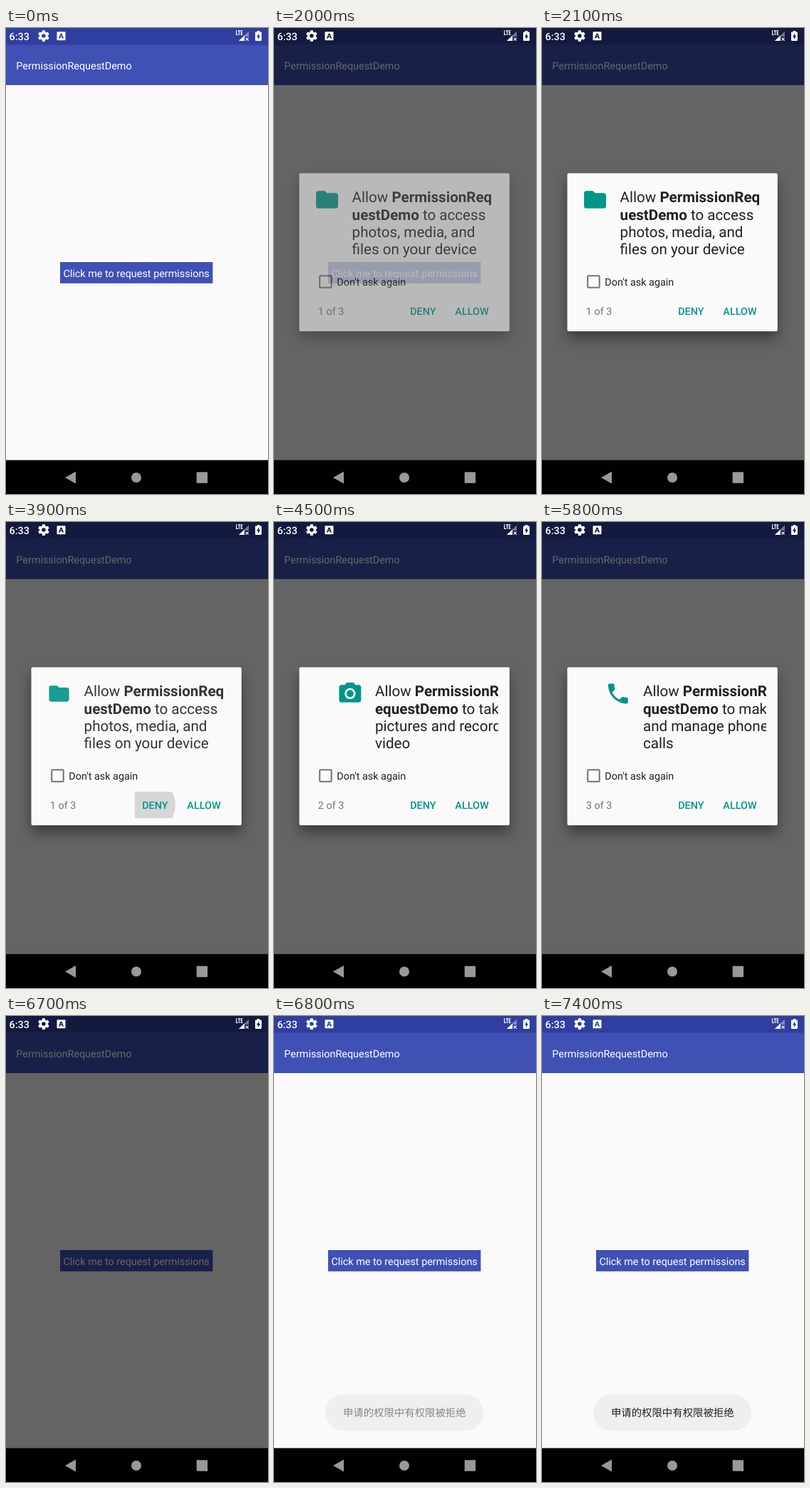
Recreate the animation shown at these times as an HTML page. Size 368 by 653 pixels, loop 7800 ms.

```html
<!DOCTYPE html>
<html lang="en">
<head>
<meta charset="utf-8">
<title>Permission request</title>
<style>
  html, body { margin: 0; width: 100%; height: 100%; overflow: hidden; background: #000; }
  svg { display: block; width: 100%; height: 100%; }
  text { font: 14.4px Roboto, sans-serif; text-rendering: geometricPrecision; }
  .medium { font-weight: 500; }
  .question { font-size: 20.6px; fill: #212121; }
  .question .app { font-weight: 700; }
  .action { font-weight: 500; fill: #009688; text-anchor: middle; }
  .toast { font-family: "Noto Sans CJK SC", "Noto Sans CJK", sans-serif; fill: #212121; }
  #dialog { filter: drop-shadow(0 10px 9px rgba(0, 0, 0, .4)); }
</style>
</head>
<body>
<svg viewBox="0 0 368 653">
  <defs>
    <clipPath id="panelClip"><rect x="36" y="204" width="279" height="130"/></clipPath>
    <clipPath id="denyClip"><rect x="181" y="378" width="57" height="37" rx="2"/></clipPath>
  </defs>

  <!-- App screen -->
  <rect width="368" height="606" fill="#fafafa"/>
  <rect width="368" height="80" fill="#3f51b5"/>
  <rect width="368" height="23.5" fill="#303f9f"/>
  <text x="14.3" y="57.6" fill="#fff">PermissionRequestDemo</text>
  <rect x="76" y="328" width="214.4" height="29.8" fill="#3f51b5"/>
  <text x="80.4" y="348.6" fill="#fff">Click me to request permissions</text>
  <rect id="dim" width="368" height="606" opacity=".6"/>

  <!-- Status bar -->
  <g fill="#fff" fill-rule="evenodd">
    <text class="medium" x="4.6" y="16.7">6:33</text>
    <path transform="translate(43.4 1.6) scale(.79)" d="M19.43 12.98c.04-.32.07-.64.07-.98s-.03-.66-.07-.98l2.11-1.65c.19-.15.24-.42.12-.64l-2-3.46c-.12-.22-.39-.3-.61-.22l-2.49 1c-.52-.4-1.08-.73-1.69-.98l-.38-2.65C14.46 2.18 14.25 2 14 2h-4c-.25 0-.46.18-.49.42l-.38 2.65c-.61.25-1.17.59-1.69.98l-2.49-1c-.23-.09-.49 0-.61.22l-2 3.46c-.13.22-.07.49.12.64l2.11 1.65c-.04.32-.07.65-.07.98s.03.66.07.98l-2.11 1.65c-.19.15-.24.42-.12.64l2 3.46c.12.22.39.3.61.22l2.49-1c.52.4 1.08.73 1.69.98l.38 2.65c.03.24.24.42.49.42h4c.25 0 .46-.18.49-.42l.38-2.65c.61-.25 1.17-.59 1.69-.98l2.49 1c.23.09.49 0 .61-.22l2-3.46c.12-.22.07-.49-.12-.64zM12 15.5a3.5 3.5 0 1 1 0-7a3.5 3.5 0 0 1 0 7z"/>
    <path transform="translate(77.5 11.2)" d="M-5-6H5q1 0 1 1V5q0 1-1 1H-5q-1 0-1-1V-5q0-1 1-1zM-1-3.5H1L3.6 3.5H2L1.4 1.8H-1.4L-2 3.5H-3.6zM0-1.8L-.9.6H.9z"/>
    <path d="M341 4.5V12h-6v6h-8z" opacity=".4"/>
    <path d="M335 10.5V18h-8z"/>
    <path d="M336.6 13.6l4 4m0-4l-4 4" stroke="#fff" stroke-width="1.2"/>
    <path d="M323.6 3.3v6.1h2.2M325.7 3.9h3.4M327.4 3.9v6M332.5 3.9h-2.3v5.5h2.3M330.2 6.6h2" fill="none" stroke="#fff" stroke-width="1.1"/>
    <path d="M352.7 4h3.6v1.5h1.7q1 0 1 1V17q0 1-1 1h-7q-1 0-1-1V6.500q0-1 1-1h1.700zM355.300 7.500L352 12.600h1.900v3.600l3.200-5.300h-1.800z"/>
  </g>

  <!-- Permission dialog -->
  <g id="dialog">
    <rect x="35.5" y="203.5" width="295.3" height="221.5" rx="2" fill="#fafafa"/>
    <g id="panels" clip-path="url(#panelClip)"></g>
    <rect x="64.2" y="347.2" width="16.5" height="16.5" rx="1" fill="none" stroke="#757575" stroke-width="2.06"/>
    <text x="88.300" y="360.700" fill="#212121">Don't ask again</text>
    <text id="count" x="61.800" y="402" fill="#757575"></text>
    <g clip-path="url(#denyClip)"><circle id="ripple" cx="201" cy="396.500" fill="#d6d6d6"/></g>
    <text class="action" x="209.400" y="402">DENY</text>
    <text class="action" x="278" y="402">ALLOW</text>
  </g>

  <g id="toast">
    <rect x="72" y="530.500" width="222" height="50.500" rx="25" fill="#efefef"/>
    <text id="message" class="toast" x="96.900" y="561.400">申请的权限中有权限被拒绝</text>
  </g>

  <!-- Navigation bar -->
  <rect y="605.500" width="368" height="48"/>
  <g fill="#999">
    <path d="M83 630L98 621.500V638.500z"/>
    <circle cx="183" cy="630" r="7"/>
    <rect x="267.700" y="622.300" width="15.400" height="15.400" rx="1"/>
  </g>
</svg>
<script>
const LOOP = 7800, STEP = 100;
const SLIDE_WIDTH = 259, SLIDE_TIME = 400, FADE_TIME = 200;
const TEXT_X = 109.6, TEXT_Y = 244.3, LINE = 24.2;

// enter: slide-in start; press: moment DENY is tapped
const requests = [
  { enter: 0, press: 3840,
    lines: ['Allow *PermissionReq*', '*uestDemo* to access', 'photos, media, and', 'files on your device'],
    icon: 'M10 4H4c-1.1 0-2 .9-2 2v12c0 1.1.9 2 2 2h16c1.1 0 2-.9 2-2V8c0-1.1-.9-2-2-2h-8z' },
  { enter: 4300, press: 5085,
    lines: ['Allow *PermissionR*', '*equestDemo* to take', 'pictures and record', 'video'],
    icon: 'M9 2L7.17 4H4c-1.1 0-2 .9-2 2v12c0 1.1.9 2 2 2h16c1.1 0 2-.9 2-2V6c0-1.1-.9-2-2-2h-3.17L15 2zM12 17a5 5 0 1 1 0-10a5 5 0 0 1 0 10zM12 8.800a3.200 3.200 0 1 0 0 6.400a3.200 3.200 0 0 0 0-6.400z' },
  { enter: 5600, press: 6560,
    lines: ['Allow *PermissionRe*', '*questDemo* to make', 'and manage phone', 'calls'],
    icon: 'M6.62 10.79c1.44 2.83 3.76 5.14 6.59 6.59l2.200-2.200c.27-.27.67-.36 1.020-.24 1.120.37 2.330.57 3.570.57.55 0 1 .45 1 1V20c0 .55-.45 1-1 1-9.390 0-17-7.610-17-17 0-.55.45-1 1-1h3.500c.55 0 1 .45 1 1 0 1.250.2 2.450.57 3.570.11.35.03.74-.25 1.020z' },
];

const $ = id => document.getElementById(id);
const clamp = v => Math.max(0, Math.min(1, v));
const show = (id, on) => $(id).setAttribute('display', on ? 'inline' : 'none');

const lineMarkup = (line, i) =>
  `<text class="question" x="${TEXT_X}" y="${TEXT_Y + i * LINE}">` +
  line.replace(/\*(.+?)\*/, '<tspan class="app">$1</tspan>') + '</text>';

$('panels').innerHTML = requests.map(r =>
  `<g><path d="${r.icon}" fill="#009688" fill-rule="evenodd"/>${r.lines.map(lineMarkup).join('')}</g>`).join('');
const panels = [...$('panels').children];

function drawPanel(panel, { enter, press }, t) {
  const left = 1 - clamp((t - enter) / SLIDE_TIME);
  const shown = 1 - clamp((t - press) / FADE_TIME) ** 2;
  const offset = enter ? SLIDE_WIDTH * left ** 3 : 0;
  panel.setAttribute('transform', `translate(${offset} 0)`);
  panel.setAttribute('opacity', shown);
  panel.firstChild.setAttribute('transform',
    `translate(74.5 240.5) scale(${1.545 * shown}) translate(-12 -12)`);
}

function drawRipple(t) {
  const last = requests.filter(r => t >= r.press).pop();
  const age = last ? t - last.press : Infinity;
  $('ripple').setAttribute('r', Math.min(50, 25 + age * .2));
  $('ripple').setAttribute('opacity', 1 - clamp((age - 160) / 150));
}

function draw(t) {
  show('dim', t >= 2000 && t < 6800);
  const opacity = clamp(Math.min(t - 1943, 6655 - t) / 100);
  show('dialog', opacity > 0);
  $('dialog').setAttribute('opacity', opacity);
  requests.forEach((r, i) => drawPanel(panels[i], r, t));
  drawRipple(t);
  const done = requests.filter(r => t >= r.press + FADE_TIME).length;
  $('count').textContent = `${Math.min(3, done + 1)} of 3`;
  show('toast', t >= 6800);
  $('message').setAttribute('opacity', .5 + .5 * clamp((t - 6900) / 300));
}

const start = performance.now();
function tick() {
  const t = (performance.now() - start) % LOOP;
  draw(Math.floor(t / STEP) * STEP);
  requestAnimationFrame(tick);
}
tick();
</script>
</body>
</html>
```
